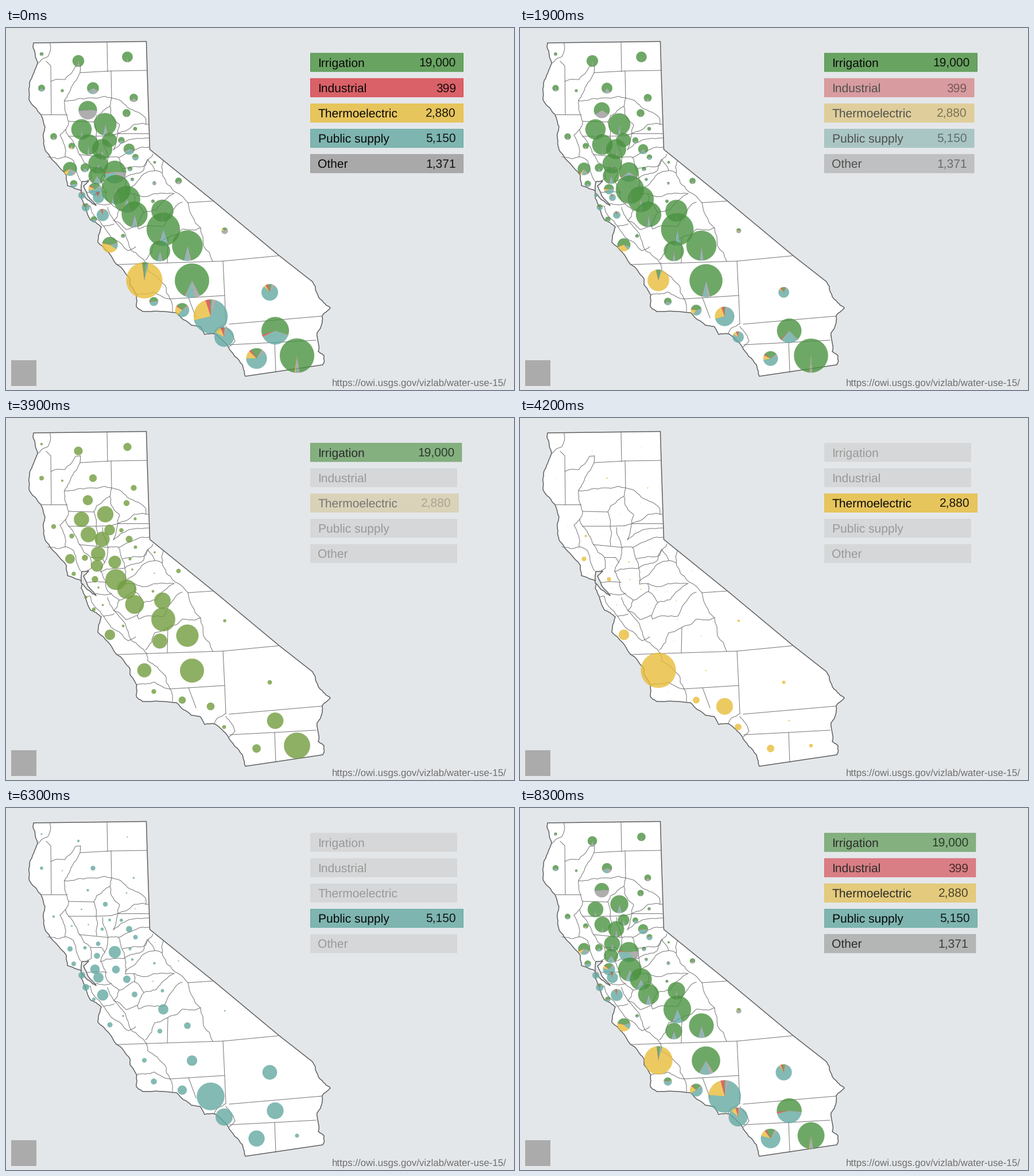
These frames come from a looping animation (885 px wide and 632 px high, 8.4 s). A matplotlib script:

```python
import numpy as np
import matplotlib.pyplot as plt
from matplotlib.animation import FuncAnimation
from matplotlib.collections import PolyCollection
from matplotlib.patches import Polygon, Rectangle

WIDTH, HEIGHT, DPI = 885, 632, 64
PX = 72 / DPI
HOLD, STEPS = 18, 4
plt.rcParams.update({"font.family": "Liberation Sans", "text.hinting": "none"})


def rgb(code):
    return np.array([int(code[i:i + 2], 16) for i in (1, 3, 5)]) / 255


BACKGROUND = rgb("#e4e7ea")
INACTIVE = rgb("#d6d7d8")
CATEGORIES = {
    "Irrigation": ("19,000", "#4a9240"),
    "Industrial": ("399", "#d73f48"),
    "Thermoelectric": ("2,880", "#e8bd3a"),
    "Public supply": ("5,150", "#64a9a2"),
    "Other": ("1,371", "#9a9a9a"),
}
COLORS = [rgb(color) for _, color in CATEGORIES.values()]
SCENES = [None, 0, 2, 3]  # None shows every category

fig = plt.figure(figsize=(WIDTH / DPI, HEIGHT / DPI), dpi=DPI, facecolor=BACKGROUND)
ax = fig.add_axes([0, 0, 1, 1])
ax.set(xlim=(0, WIDTH), ylim=(HEIGHT, 0))
ax.axis("off")
rng = np.random.default_rng(5)


def roughen(coords, wobble, rounds=3):
    """Bend a line through its key points by shifting midpoints sideways."""
    points = np.reshape(coords, (-1, 2)).astype(float)
    for _ in range(rounds):
        delta = np.diff(points, axis=0)
        shift = rng.uniform(-wobble, wobble, (len(delta), 1))
        middle = points[:-1] + delta / 2 + shift * delta[:, ::-1] * (-1, 1)
        points = np.insert(points, range(1, len(points)), middle, axis=0)
    return points


def area(points, fill):
    ax.add_patch(Polygon(points, facecolor=fill, edgecolor="#5e5e5e",
                         lw=1.5 * PX, joinstyle="round"))


def straight(*coords):
    ax.plot(coords[::2], coords[1::2], color="#757575", lw=PX, zorder=1.5)


def winding(*coords):
    straight(*roughen(coords, .1).ravel())


# State outline, clockwise from the north-west corner
land = [48, 26, 244.5, 23.5, 246, 75, 250.5, 212, 362, 302.5, 476, 397.5, 534, 443]
river = [534, 443, 551, 476, 565, 489, 551, 502, 551, 513, 542, 532, 544, 565, 554, 572,
         552, 588]
south_coast = [417, 608, 412, 588, 387, 556, 364, 534, 346, 535, 338, 521, 323, 519,
               297, 497, 238, 495, 227, 486, 228, 466, 216, 448, 216, 438, 192, 412]
north_coast = [192, 412, 160, 374, 166, 347, 147, 335, 131, 297, 133, 286, 107, 275,
               105, 257, 70, 216, 66, 197, 68, 172, 61, 151, 40, 125, 40, 111, 50, 74,
               55, 62, 47, 33]
area(np.vstack([np.reshape(land, (-1, 2)), roughen(river, .1),
                roughen(south_coast, .08), roughen(north_coast, .08)]), "white")
area(roughen([131, 288, 131, 275, 132, 268, 144, 267, 135, 276, 143, 294, 157, 310,
              141, 299, 131, 288], .06), BACKGROUND)

# Surveyed county lines
straight(129, 78, 183, 75, 246, 74)
straight(176, 25, 177, 76)
straight(183, 75, 184, 122)
straight(70, 58, 78, 66, 79, 151)
straight(61, 151, 106, 151)
straight(109, 163, 153, 164)
straight(109, 189, 156, 189, 182, 188)
straight(195, 184, 249, 184)
straight(128, 221, 178, 226)
straight(147, 243, 165, 243)
straight(317, 305, 361, 302)
straight(282, 366, 281, 410)
straight(192, 413, 378, 407, 476, 397.5)
straight(378, 407, 381, 468, 383, 516)
straight(286, 473, 381, 467)
straight(318, 471, 331, 506)
straight(389, 517, 550, 503)
straight(390, 553, 468, 549, 540, 545)
straight(468, 549, 470, 601)

# County lines along rivers and ridges
winding(77, 26, 73, 50, 55, 62)
winding(78, 93, 103, 90, 121, 67, 130, 66, 129, 78, 110, 113, 102, 127)
winding(102, 127, 146, 122, 196, 125, 208, 134, 243, 157, 244, 168)
winding(102, 127, 109, 163, 104, 177, 109, 189, 120, 205, 128, 221)
winding(153, 164, 158, 153, 181, 137, 184, 122)
winding(181, 137, 188, 160, 198, 169, 195, 184, 182, 188)
winding(248, 168, 224, 168, 195, 184, 187, 213, 214, 195, 250, 192)
winding(153, 164, 157, 190, 158, 223)
winding(104, 177, 94, 187, 103, 225, 73, 225)
winding(168, 191, 178, 226, 172, 252, 165, 268)
winding(178, 226, 196, 226, 227, 212, 250, 208)
winding(196, 226, 207, 262, 165, 268)
winding(203, 246, 243, 240, 256, 220)
winding(103, 225, 118, 232, 130, 267)
winding(128, 221, 147, 243, 149, 262, 141, 266)
winding(207, 262, 239, 249, 247, 229, 259, 249, 272, 253, 274, 232)
winding(165, 243, 172, 252)
winding(165, 268, 177, 302, 197, 318, 188, 336, 218, 388, 245, 411)
winding(207, 262, 208, 290, 223, 289, 224, 303, 197, 318)
winding(208, 285, 236, 258, 259, 249)
winding(223, 289, 247, 294, 292, 289)
winding(272, 253, 292, 284, 317, 305, 339, 349, 360, 407)
winding(224, 303, 240, 322, 262, 317, 293, 289)
winding(188, 336, 209, 352, 229, 345, 240, 322)
winding(229, 345, 231, 351, 275, 346, 307, 304)
winding(141, 287, 176, 287)
winding(150, 307, 184, 306)
winding(138, 313, 147, 311, 170, 346, 188, 342)
winding(177, 313, 188, 336)
winding(170, 346, 213, 389, 226, 382)
winding(243, 405, 259, 375, 282, 366, 308, 351, 339, 349)
winding(245, 411, 247, 424, 277, 449, 286, 473)
winding(228, 466, 258, 461, 286, 473, 290, 495)
winding(362, 534, 368, 524, 383, 516)
winding(383, 521, 399, 546, 389, 557)

centers, radii = [], []


def county(x, y, irrigation, supply, thermo=.4, other=None):
    """Radii of each category; minor uses follow from the major ones."""
    if other is None:
        other = .13 * irrigation + .24 * supply
    centers.append((x, y))
    radii.append((irrigation, .25 * supply, thermo, supply, other))


county(62, 45.5, 2.6, 1.4)
county(126, 57.5, 9.7, 2)
county(211.5, 50.5, 9, .9)
county(62, 105, 5, 2.7)
county(98, 109.5, 2.3, .8)
county(151.5, 105, 8.3, 4, 1, 4.2)
county(222.5, 122, 6.2, 1.5, .9, 3)
county(142.5, 143.5, 11.4, 2, 0, 11)
county(210, 148.5, 6.5, 1.2)
county(83, 189.5, 5.2, 2)
county(131.5, 177, 17.4, 1.2)
county(173, 168, 18.6, 4)
county(225, 176, 3.1, .7)
county(201, 196, 4.6, 2.7)
county(180.5, 195.5, 12, 2.2)
county(143.5, 203.5, 17.6, 1.1)
county(114.5, 206, 4.8, 1.4, 1.9)
county(167.5, 211.5, 17.1, 2.6)
county(214.5, 211.5, 7.5, 5.3)
county(225.5, 225.5, 3.6, 3.8)
county(259, 234.5, 2.1, .5)
county(111.5, 246, 9.7, 4.4, 3.8, 4)
county(137.5, 244, 6.7, 2.8)
county(160.5, 237, 16.3, 3.7)
county(189.5, 251.5, 14.1, 10.4, 1.1, 8.6)
county(216, 246, 3.1, 2.3)
county(158.5, 258, 13.4, 5)
county(118, 272, 4.5, 3.9)
county(155, 281.5, 6.1, 8.1, 3.5)
county(161, 296, 2, 8.8)
county(132, 292, 0, 5.6)
county(139, 313, 3.2, 5.6)
county(153, 334, 4, 2.9)
county(168.5, 326.5, 2, 9.6, .7)
county(220, 264.5, 2, 2)
county(191.5, 282, 23.8, 6.6, .8)
county(210.5, 299, 21.8, 6.3, .9)
county(258.5, 271, 1.2, 2, 0, 2.4)
county(300.5, 267, 4.8, .9, .5, 2.8)
county(256, 302.5, 2.7, .8)
county(224, 325.5, 21.5, 4.8)
county(272.5, 319, 18.7, 2.8, .7)
county(274, 351.5, 27.4, 8.7, .7, 2)
county(204, 363, 2.7, 1.6)
county(181, 378.5, 8.9, 4.3, 9)
county(268, 389.5, 17, 4)
county(316, 380, 25.5, 5.6, .6)
county(381, 354, 2.8, 1.2, 2, 4.1)
county(241, 440.5, 6, 3.9, 30.5)
county(324, 441, 27.4, 8.9, 1, 7)
county(257.5, 477.5, 5.2, 5)
county(307, 492.5, 6.3, 7.9, 5.7)
county(356.5, 503.5, 4, 24, 14.4)
county(459.5, 461.5, 4, 12.6, 2.8)
county(380, 539.5, 2.5, 14.8, 5.6)
county(469, 528.5, 18.5, 14.4, 1.1, 2.4)
county(436.5, 577, 7.5, 13.9, 6.3)
county(507, 572, 29.2, 3.3, 3)
areas = np.square(radii)

ax.add_patch(Rectangle((9, 579.5), 44, 45.5, color="#ababab", lw=0))


def label(x, y, text, size=21, **style):
    return ax.text(x, y, text, fontsize=size * PX, va="baseline", **style)


label(872, 624, "https://owi.usgs.gov/vizlab/water-use-15/", 16.85, ha="right",
      color="#6e6e6e")

pies = PolyCollection([], lw=.6 * PX, zorder=3)
ax.add_collection(pies, autolim=False)
bars, names, values = [], [], []
for row, (name, (total, _)) in enumerate(CATEGORIES.items()):
    top = 44 + 44.2 * row
    bars.append(ax.add_patch(Rectangle((530.5, top), 255, 32, lw=PX, snap=False)))
    names.append(label(543.5, top + 23.2, name))
    values.append(label(773, top + 23.2, total, ha="right", color="black"))


def lerp(a, b, p):
    return a + (b - a) * p


def weights(scene):
    return np.ones(5) if scene is None else np.eye(5)[scene]


def sector(center, radius, start, sweep):
    angle = np.linspace(start, start + sweep, max(3, int(sweep * 14)))
    arc = center + radius * np.column_stack([np.cos(angle), -np.sin(angle)])
    return arc if sweep > 6.28 else np.vstack([center, arc])


def draw_pies(before, after, p):
    sizes = lerp(*(np.sqrt(areas @ weights(s)) for s in (before, after)), p)
    mix = lerp(weights(before), weights(after), p)
    shapes, fills = [], []
    for center, own, radius in zip(centers, areas, sizes):
        if radius < .05:
            continue
        if before is not None and after is not None:
            shapes.append(sector(center, radius, 0, 2 * np.pi))
            fills.append((*lerp(COLORS[before], COLORS[after], p), .8))
            continue
        share = own * mix
        sweeps = 2 * np.pi * share / share.sum()
        start = np.pi / 2 - sweeps[0] / 2
        for sweep, color in zip(sweeps, COLORS):
            if sweep > .004:
                shapes.append(sector(center, radius, start, sweep))
                fills.append((*color, .8))
            start += sweep
    pies.set_verts(shapes)
    pies.set_facecolor(fills)
    pies.set_edgecolor([(*fill[:3], .4) for fill in fills])


def draw_legend(active):
    for bar, name, value, color, on in zip(bars, names, values, COLORS, active):
        bar.set_width(255 + 11 * on)
        bar.set_facecolor(lerp(INACTIVE, lerp(BACKGROUND, color, .8), on))
        bar.set_edgecolor(lerp(INACTIVE, lerp(BACKGROUND, color, .95), on))
        name.set_color(str(lerp(.6, .03, on)))
        value.set_x(773 + 11 * on)
        value.set_alpha(.88 * on)


def update(frame):
    index, step = divmod(frame, HOLD + STEPS - 1)
    p = max(0, step - HOLD + 1) / STEPS
    before, after = SCENES[index], SCENES[(index + 1) % len(SCENES)]
    if p == 0:
        after = before
    draw_pies(before, after, p)
    draw_legend(lerp(weights(before), weights(after), p))
    return [pies, *bars, *names, *values]


animation = FuncAnimation(fig, update, frames=84, interval=100, repeat=True)
plt.show()
```
